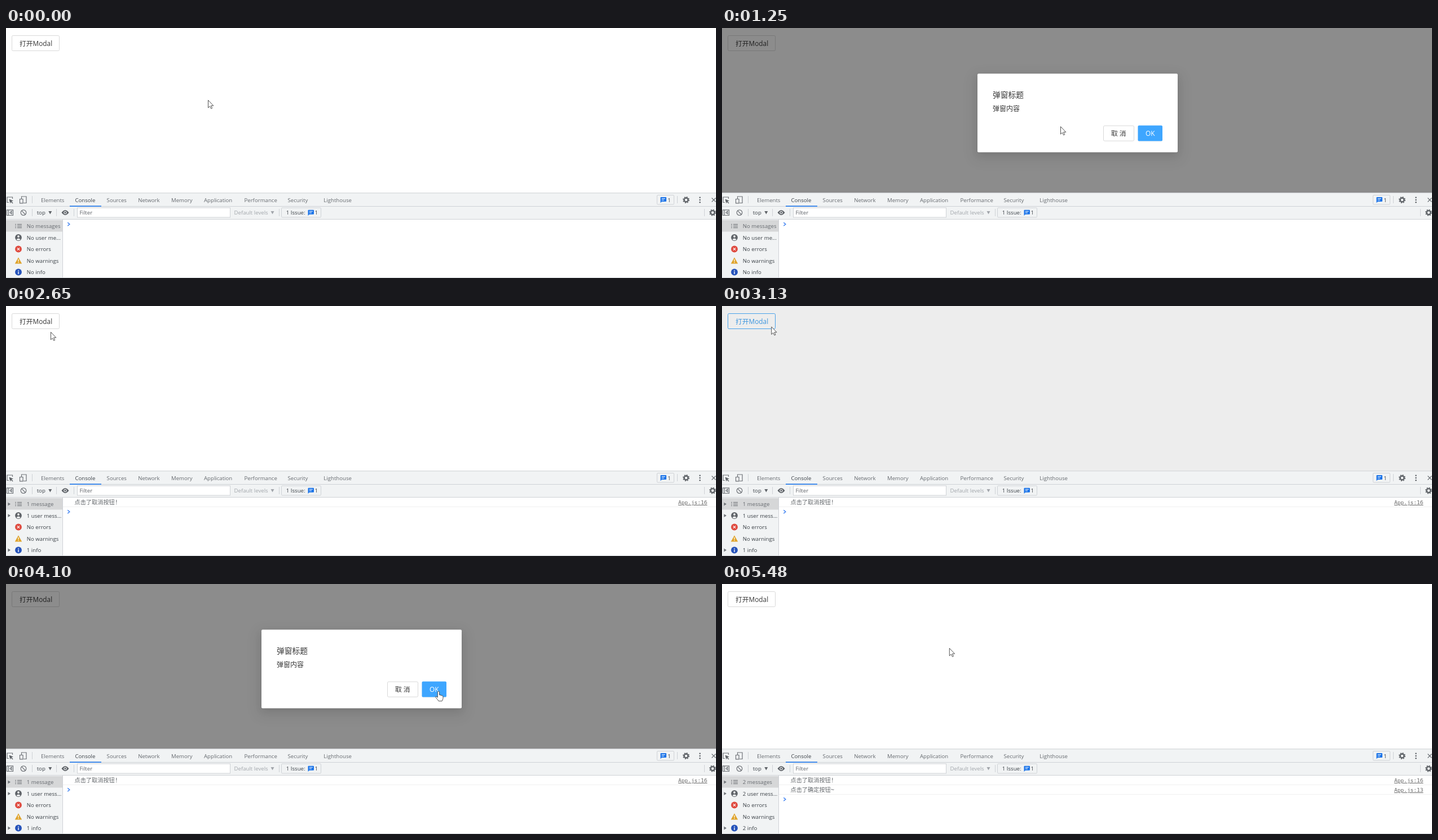
Recreate the animation shown at these times as an HTML page. Size 1259 by 445 pixels, loop 5550 ms.

```html
<!DOCTYPE html>
<html lang="zh">
<head>
<meta charset="utf-8">
<title>Modal</title>
<style>
html, body { margin: 0; width: 100%; height: 100%; overflow: hidden; background: #fff; }
svg { display: block; width: 100%; height: 100%; }
text { font: 9.65px "Open Sans", "Noto Sans CJK SC", sans-serif; fill: #3b4147; white-space: pre; }
.ui { font-size: 11.8px; fill: #383838; }
.tab { fill: #666a6f; }
.dim { fill: #a2a6ab; }
.log { font: 300 10.2px "DejaVu Sans Mono", "Noto Sans CJK SC", monospace; fill: #63676b; }
.link { font: 9.5px "DejaVu Sans Mono", monospace; fill: #666; text-decoration: underline; }
.line { stroke: #cfd2d6; fill: none; }
.icon { stroke: #6e7277; stroke-width: 1.2; fill: none; }
.solid { fill: #5f6368; }
</style>
</head>
<body>
<svg viewBox="0 0 1259 445" xmlns="http://www.w3.org/2000/svg">
  <defs>
    <g id="gear">
      <circle r="3.5" fill="none" stroke="#5f6368" stroke-width="2.4"/>
      <circle r="5.2" fill="none" stroke="#5f6368" stroke-width="1.6" stroke-dasharray="2.04"/>
    </g>
    <g id="bubble">
      <path d="M1 0H9.5Q10.5 0 10.5 1V7Q10.5 8 9.5 8H2.5L0 10.3V1Q0 0 1 0Z" fill="#1a73e8"/>
      <path d="M2.2 2.6H8.3M2.2 5.2H6.5" stroke="#fff"/>
    </g>
  </defs>

  <rect width="1259" height="445" fill="#fff"/>
  <g id="trigger">
    <rect class="wave" fill="none" stroke="#1890ff"/>
    <rect class="box" x="10.5" y="13.5" width="84" height="27" rx="2" fill="#fff"/>
    <text class="ui" x="24" y="32">打开Modal</text>
  </g>
  <rect id="mask" width="1259" height="293"/>

  <g id="modal">
    <rect x="456" y="87" width="349" height="133" opacity=".12" style="filter:blur(2.6px)"/>
    <rect x="453" y="86" width="355" height="140" opacity=".08" style="filter:blur(6.9px)"/>
    <rect x="446" y="82" width="369" height="154" opacity=".06" style="filter:blur(12px)"/>
    <rect x="453" y="81.3" width="355" height="140" rx="2" fill="#fff"/>
    <text class="ui" x="480" y="123.7" style="font-size:13.75px">弹窗标题</text>
    <text class="ui" x="480" y="148.4" style="font-size:12px">弹窗内容</text>
    <g id="cancel">
      <rect class="wave" fill="none" stroke="#1890ff"/>
      <rect class="box" x="676.5" y="174" width="54" height="27" rx="2" fill="#fff"/>
      <text class="ui" x="690" y="192.2">取 消</text>
    </g>
    <rect x="737.5" y="174.5" width="43.5" height="28" rx="2" opacity=".05"/>
    <rect x="737.5" y="173.5" width="43.5" height="27.7" rx="2" fill="#3ea6ff"/>
    <text class="ui" x="751" y="192" style="fill:#fff">OK</text>
  </g>

  <rect y="293" width="1259" height="48" fill="#f1f3f4"/>
  <rect y="341" width="1259" height="104" fill="#fff"/>
  <rect y="341" width="100" height="104" fill="#f1f3f4"/>
  <rect y="342" width="100" height="20.5" fill="#d6d7d8"/>
  <path class="line" d="M0 293.7H1259M0 317.5H1259M0 340.5H1259M100.5 341V445M0 444.5H1259"/>
  <path class="line" d="M46.5 299V312M1190.5 299V312M46.5 322V335M89.5 322V335M120.5 322V335M484.5 322V335M1238.5 322V335"/>
  <rect x="113" y="316.4" width="56" height="1.6" fill="#1a73e8"/>
  <g id="tabs"></g>

  <g class="icon">
    <path d="M5 310.5H2V301H11.5V304"/>
    <path d="M5.5 304.5L13 307.5L9.8 308.7L12.6 311.5L11.5 312.5L8.7 309.8L7.5 312.5Z" class="solid" stroke="none"/>
    <path d="M27.5 304V300H36V311.5H31M24.5 304.5H30V311.8H24.5Z"/>
    <path d="M1.5 323.8H12.5V333.5H1.5ZM4.5 324V333.5M10 326L7 328.6L10 331.2Z"/>
    <circle cx="31" cy="328.6" r="4.8"/>
    <path d="M27.7 325.2L34.3 332"/>
    <path d="M1251.5 302.5L1258.5 309.5M1258.5 302.5L1251.5 309.5"/>
  </g>
  <g class="solid">
    <circle cx="1230.5" cy="301.7" r="1.3"/><circle cx="1230.5" cy="306" r="1.3"/><circle cx="1230.5" cy="310.3" r="1.3"/>
    <path d="M75.3 326H81.3L78.3 331.4Z"/>
    <path class="dim" d="M469.5 326H475.5L472.5 331.4Z"/>
    <path d="M98.5 328.6Q105 319.8 111.5 328.6Q105 337.4 98.5 328.6Z"/>
    <circle cx="105" cy="328.6" r="2.7" fill="#f1f3f4"/><circle cx="105" cy="328.6" r="1.6"/>
  </g>
  <use href="#gear" x="1206" y="306"/>
  <use href="#gear" x="1253" y="328.6"/>

  <rect class="line" x="1154.5" y="297.5" width="30" height="16.5" rx="1.5"/>
  <use href="#bubble" x="1160.5" y="301"/>
  <text x="1173.3" y="309.6">1</text>
  <text x="54.7" y="332.2">top</text>
  <rect class="line" x="126.5" y="320" width="271" height="17" style="fill:#fff"/>
  <text x="130.5" y="332.4" style="fill:#5c6066">Filter</text>
  <text class="dim" x="404.5" y="332.2">Default levels</text>
  <rect class="line" x="488.5" y="320" width="70" height="17" rx="1.5"/>
  <text x="496.8" y="332.2">1 Issue:</text>
  <use href="#bubble" x="535.5" y="323.7"/>
  <text x="547.5" y="332.2">1</text>

  <path d="M20 349.5H28M20 352.5H28M20 355.5H28M16.2 349.5H18M16.2 352.5H18M16.2 355.5H18" stroke="#5f6368" stroke-width="1.2"/>
  <circle cx="22" cy="373" r="5.9" class="solid"/>
  <circle cx="22" cy="371" r="1.9" fill="#f1f3f4"/>
  <path d="M18.4 376.4Q22 372.4 25.6 376.4Q22 379.6 18.4 376.4Z" fill="#f1f3f4"/>
  <circle cx="22" cy="393.5" r="5.9" fill="#df4a3f"/>
  <path d="M19.8 391.3L24.2 395.7M24.2 391.3L19.8 395.7" stroke="#fff" stroke-width="1.2"/>
  <path d="M22 408.3L28.2 419.4H15.8Z" fill="#dfa32a"/>
  <path d="M22 411.8V415.6M22 416.6V418" stroke="#fff" stroke-width="1.3"/>
  <circle cx="22" cy="434.5" r="5.9" fill="#2653ba"/>
  <path d="M22 431V432.5M22 433.6V438" stroke="#fff" stroke-width="1.4"/>
  <path id="arrows" d="M3.5 349.7L8 352.6L3.5 355.5ZM3.5 370.2L8 373.1L3.5 376ZM3.5 431.6L8 434.5L3.5 437.4Z" fill="#6e7277"/>
  <g id="side"></g>
  <g id="logs"></g>
  <path id="prompt" d="M109.3 346.2L112.8 349.2L109.3 352.2" fill="none" stroke="#367cf1" stroke-width="1.4"/>

  <g fill="#fff" stroke="#333" stroke-width=".85" stroke-linejoin="round">
    <path id="arrow" d="M.5 .5V14L3.5 11.2L5.7 15.6L7.7 14.7L5.6 10.3H9.8Z"/>
    <path id="hand" d="M-1.7 11V1.6A1.6 1.6 0 0 1 1.5 1.6V6.3L6.4 7.6Q8 8.2 8 9.8V12.5Q7.6 15 6.2 17.3H0Q-1.4 14.6-5.2 10.6Q-5.2 8.4-3.2 9.4Z"/>
  </g>
</svg>

<script>
const LOOP = 5550;
const $ = id => document.getElementById(id);
const clamp = v => Math.max(0, Math.min(1, v));
const span = (t, from, length) => clamp((t - from) / length);

function bezier(x1, y1, x2, y2) {
  const at = (a, b, u) => 3 * (1 - u) * (1 - u) * u * a + 3 * (1 - u) * u * u * b + u * u * u;
  return x => {
    if (x <= 0 || x >= 1) return clamp(x);
    let lo = 0, hi = 1;
    for (let i = 0; i < 24; i++) {
      const mid = (lo + hi) / 2;
      if (at(x1, x2, mid) < x) lo = mid; else hi = mid;
    }
    return at(y1, y2, lo);
  };
}
const outCirc = bezier(.08, .82, .17, 1);
const inOutCirc = bezier(.78, .14, .15, .86);

// Each visit: hover the trigger, open from the click point, log, close.
const visits = [
  { hover: 490, open: 710, close: 2095, log: 2080, x: 75, y: 31 },
  { hover: 2740, open: 3038, close: 4176, log: 4160, x: 64, y: 31 }
];
const messages = [['点击了取消按钮!', 'App.js:16'], ['点击了确定按钮~', 'App.js:13']];

// Pointer path: time, x, y
const path = [
  [0, 358, 128], [70, 345, 118], [210, 240, 55], [350, 130, 3], [490, 78, 24], [560, 75, 31],
  [740, 75, 31], [830, 131, 46], [970, 360, 110], [1180, 543, 163], [1250, 600, 175],
  [1460, 685, 185], [1740, 696, 186.5], [2090, 696, 186.5], [2160, 640, 180], [2300, 408, 150],
  [2440, 250, 95], [2650, 79, 46], [2790, 64, 31], [3060, 64, 31], [3140, 250, 75],
  [3260, 624, 158], [3400, 730, 200], [3540, 850, 216], [3680, 850, 216], [3820, 790, 198],
  [3960, 767, 191], [4450, 767, 191], [4590, 758, 190], [4660, 735, 185], [4870, 560, 140],
  [5080, 410, 116], [5150, 400, 114], [5480, 403.3, 113.8]
];
const handTimes = [[490, 760], [1440, 2100], [2740, 3070], [3890, 4560]];

const label = (x, y, text, cls = '', extra = '') =>
  `<text class="${cls}" x="${x}" y="${y}" ${extra}>${text}</text>`;

const tabs = { Elements: 62, Console: 122.4, Sources: 178.6, Network: 234.2, Memory: 293,
  Application: 351, Performance: 422.5, Security: 499.5, Lighthouse: 563.3 };
$('tabs').innerHTML = Object.entries(tabs)
  .map(([name, x]) => label(x, 309.7, name, name === 'Console' ? '' : 'tab')).join('');

let shown = -1;
function showLogs(n) {
  if (n === shown) return;
  shown = n;
  const rows = [`${n || 'No'} message${n === 1 ? '' : 's'}`, n ? `${n} user mess...` : 'No user me...',
    'No errors', 'No warnings', `${n || 'No'} info`];
  $('side').innerHTML = rows.map((row, i) => label(36.8, 356.2 + i * 20.5, row, i ? '' : 'tab')).join('');
  $('logs').innerHTML = messages.slice(0, n).map(([text, link], i) => {
    const y = 353.2 + i * 17;
    return label(121.5, y, text, 'log') + label(1243.5, y - .2, link, 'link', 'text-anchor="end"') +
      `<path d="M101 ${357.5 + i * 17}H1259" stroke="#f0f0f0"/>`;
  }).join('');
  $('arrows').style.display = n ? '' : 'none';
  $('prompt').setAttribute('transform', `translate(0 ${n * 17})`);
}

const blend = (a, b, k) => `rgb(${a.map((v, i) => Math.round(v + (b[i] - v) * k))})`;
const blue = [64, 169, 255];
const gray = v => [v, v, v];

function paintButton(id, glow, waveStart, t) {
  const box = document.querySelector(`#${id} .box`);
  const wave = document.querySelector(`#${id} .wave`);
  box.style.stroke = blend(gray(217), blue, glow);
  document.querySelector(`#${id} text`).style.fill = blend(gray(56), blue, glow);
  const age = t - waveStart;
  const on = age > 0 && age < 370;
  wave.style.display = on ? '' : 'none';
  if (!on) return;
  const size = 5 * outCirc(age / 400);
  const { x, y, width, height } = box.getBBox();
  const pad = size / 2 + .5;
  const attrs = { x: x - pad, y: y - pad, width: width + 2 * pad, height: height + 2 * pad,
    rx: 2 + pad, 'stroke-width': size, opacity: .22 * (1 - outCirc(age / 2000)) };
  for (const key in attrs) wave.setAttribute(key, attrs[key]);
}

function pointerAt(t) {
  let i = 0;
  while (i < path.length - 2 && path[i + 1][0] <= t) i++;
  const [a, b] = [path[i], path[i + 1]];
  const k = span(t, a[0], b[0] - a[0]);
  return [a[1] + (b[1] - a[1]) * k, a[2] + (b[2] - a[2]) * k];
}

// The picture advances in held steps of 70 ms, realigned twice per loop.
function hold(t) {
  const base = t >= 3260 ? 3260 : t >= 830 ? 830 : 0;
  return base + Math.floor((t - base) / 70) * 70;
}

function draw(t) {
  const v = visits[t < 2400 ? 0 : 1];
  const closing = span(t, v.close, 200);
  $('mask').setAttribute('opacity', .45 * span(t, v.open, 200) * (1 - closing));

  const size = t < v.close ? outCirc(span(t, v.open + 36, 300)) : 1 - inOutCirc(closing);
  const scale = .2 + .8 * size;
  $('modal').style.display = size > 0 ? '' : 'none';
  $('modal').setAttribute('opacity', size);
  $('modal').setAttribute('transform', `translate(${v.x} ${v.y}) scale(${scale}) translate(${-v.x} ${-v.y})`);

  const hover = span(t, v.hover, 200) * (1 - span(t, v.open + 20, 300)) ** 2;
  paintButton('trigger', hover, v.open + 80, t);
  paintButton('cancel', t < 2400 ? span(t, 1440, 200) : 0, visits[0].log, t);
  showLogs(visits.filter(visit => t >= visit.log).length);

  const [x, y] = pointerAt(t);
  const hand = handTimes.some(([from, to]) => t >= from && t < to);
  $('hand').style.display = hand ? '' : 'none';
  $('arrow').style.display = hand ? 'none' : '';
  $(hand ? 'hand' : 'arrow').setAttribute('transform', `translate(${x} ${y})`);
}

const start = performance.now();
function tick() {
  draw(hold((performance.now() - start) % LOOP));
  requestAnimationFrame(tick);
}
tick();
</script>
</body>
</html>
```
